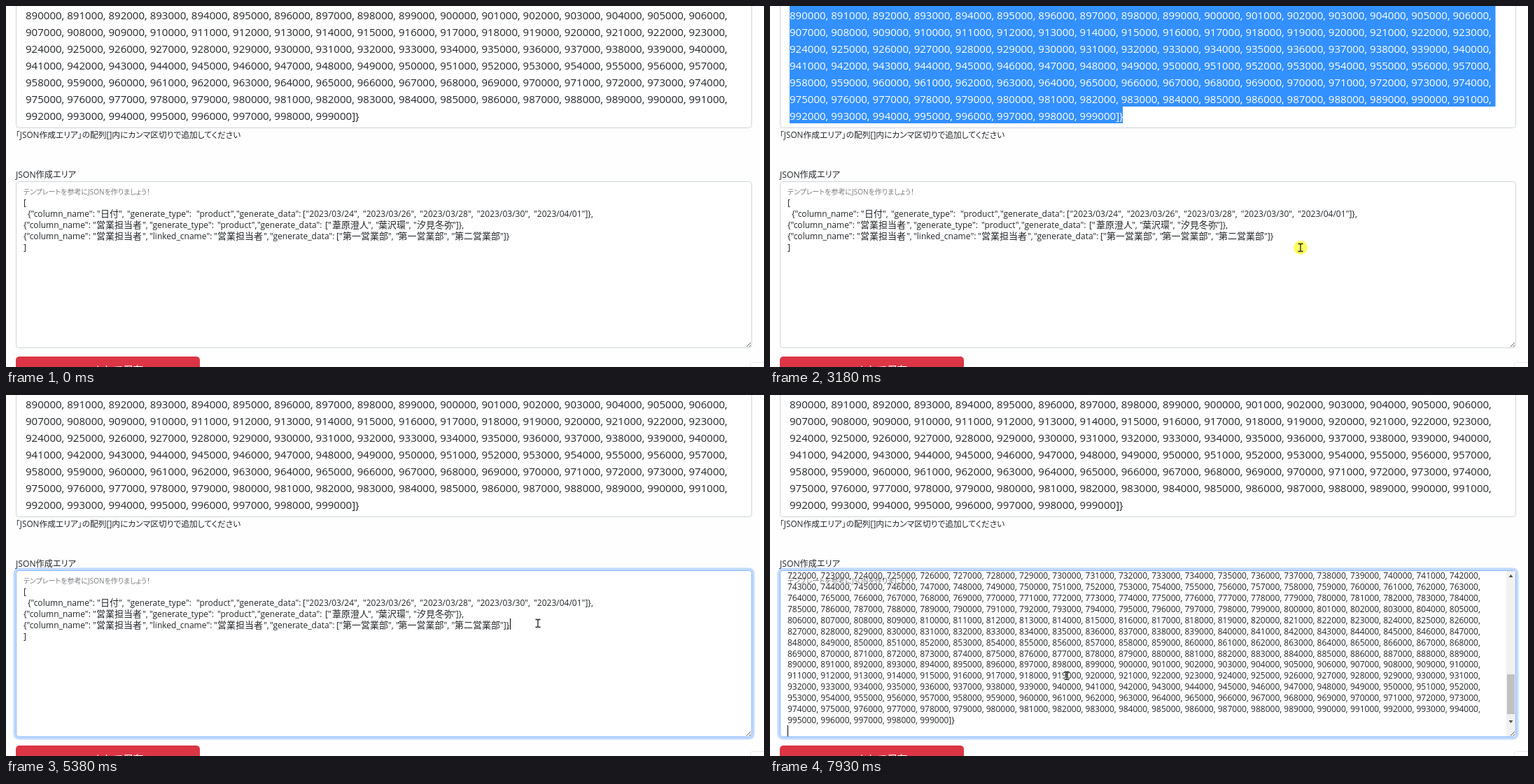
Animation, 1083 px wide and 517 px high, one loop 7990 ms. Source, as an HTML page:

```html
<!DOCTYPE html>
<html lang="ja">
<head>
<meta charset="utf-8">
<title>JSON作成エリア</title>
<style>
  html, body { margin: 0; height: 100%; overflow: hidden; background: #fefefe; }
  svg { display: block; }
  text { font-family: "Open Sans", "Noto Sans CJK JP", sans-serif; fill: #212529; white-space: pre; }
  .kana { font-feature-settings: "palt"; }
  .selected text { fill: #fff; }
  .hidden { display: none; }
</style>
</head>
<body>
<svg width="1083" height="517" viewBox="0 0 1083 517">
  <rect x="14.5" y="-20" width="1051" height="194.5" rx="4" fill="#fff" stroke="#ced4da"/>
  <g id="template">
    <path id="selection" fill="#3390ff" d="M28 0H1036.500V144H504V168H28Z"/>
  </g>
  <text class="kana" x="14" y="189" font-size="11.75">「JSON作成エリア」の配列[]内にカンマ区切りで追加してください</text>
  <text class="kana" x="14" y="246" font-size="12.2">JSON作成エリア</text>

  <rect id="ring" x="12.500" y="249.500" width="1055" height="242" rx="6" fill="none" stroke="#0d6efd" stroke-opacity=".25" stroke-width="4"/>
  <rect id="area" x="14.5" y="251.5" width="1051" height="238" rx="4" fill="#fff"/>
  <g id="draft"></g>
  <g id="pasted">
    <rect x="1052" y="252" width="13" height="237" fill="#f1f1f1"/>
    <rect x="1053" y="400" width="11" height="57" fill="#c1c1c1"/>
    <path d="M1055.500 261L1058.500 257L1061.500 261ZM1055.500 466L1058.500 470L1061.500 466Z" fill="#505050"/>
  </g>
  <text class="kana" x="25" y="269.500" font-size="10" opacity=".6">テンプレートを参考にJSONを作りましょう！</text>
  <path d="M1058 488L1064 482M1062 488L1064 486" stroke="#555"/>
  <rect id="caret" width="1" fill="#000"/>

  <rect x="14" y="502" width="263" height="40" rx="5" fill="#dc3545"/>
  <text class="kana" x="92" y="527" font-size="15" style="fill:#fff">JSONとして保存</text>
  <rect x="1063.5" y="510.5" width="40" height="40" rx="3" fill="#fff" stroke="#e8e8e8"/>

  <g fill="#fff" stroke="#ccc">
    <rect id="modePopup" x="695.5" y="338.5" width="41" height="41" rx="3"/>
    <rect id="suggestPopup" x="711.5" y="338.5" width="88" height="34" rx="3"/>
  </g>
  <g id="pointer">
    <circle id="press" r="10" fill="#ffff5a" opacity=".95"/>
    <path id="beam" d="M-3.500 -5.500H-1L0 -4.500L1 -5.500H3.500M-3.500 5.500H-1L0 4.500L1 5.500H3.500M0 -5V5" fill="none" stroke="#222" stroke-width="1.300"/>
    <path id="arrow" d="M.5 .5V10.500L2.800 8.400L4.500 12L6 11.300L4.400 7.800H7.600Z" fill="#fff" stroke="#333" stroke-width=".9"/>
  </g>
</svg>
<script>
const LOOP = 7990;
const $ = id => document.getElementById(id);

function addText(parent, x, y, size, content) {
  const el = document.createElementNS('http://www.w3.org/2000/svg', 'text');
  for (const [key, value] of Object.entries({ x, y, 'font-size': size })) el.setAttribute(key, value);
  el.textContent = content;
  parent.append(el);
  return el;
}

// Rows of consecutive thousands, closed after 999000.
function addNumbers(parent, first, perRow, x, y, size, leading) {
  for (let start = first; start < 1000; start += perRow, y += leading) {
    const count = Math.min(perRow, 1000 - start);
    const row = Array.from({ length: count }, (_, i) => `${start + i}000`).join(', ');
    addText(parent, x, y, size, row + (start + count < 1000 ? ',' : ']}'));
  }
}

// Chunks alternate between x position and text.
function addLine(y, ...chunks) {
  for (let i = 0; i < chunks.length; i += 2) {
    const isKanji = chunks[i + 1].charCodeAt(0) > 255;
    addText($('draft'), chunks[i], y, isKanji ? 13 : 12.02, chunks[i + 1]);
  }
}

addNumbers($('template'), 890, 17, 28, 19, 15.06, 23.95);
addNumbers($('pasted'), 722, 21, 25, 263, 12.02, 15.93);

const column = '{"column_name": "', type = '"generate_type":', data = '"generate_data":';
const product = '"product",', staff = '営業担当者', next = '", "';
addLine(286, 25, '[');
addLine(302, 31, column, 135, '日付', 161, '",', 173, type, 272, product, 329, data, 424, '[');
['24', '26', '28', '30'].forEach((day, i) => addLine(302, 428.5 + i * 81.4, `"2023/03/${day}",`));
addLine(302, 754, '"2023/04/01"]},');
addLine(318, 25, column, 129, staff, 195, '",', 205, type, 302, product, 359, data, 456, '["',
  466, '葦原澄人', 517, next, 532, '葉沢環', 571, next, 587, '汐見冬弥', 638, '"]},');
addLine(333.5, 25, column, 129, staff, 195, '",', 205, '"linked_cname":', 297, '"', 302, staff, 368, '",',
  377, data, 472, '["', 481, '第一営業部', 546, next, 560.5, '第一営業部', 625.5, next,
  641, '第二営業部', 706, '"]}');
const comma = addText($('draft'), 716.5, 333.5, 12.02, ',');
const bracket = addText($('draft'), 25, 350, 12.02, ']');

const path = [
  [70, 884, 412], [590, 507, 124], [800, 526, 159], [2660, 526, 159],
  [3150, 758, 346], [3180, 758, 346], [3250, 758, 339], [3430, 758, 267],
  [3569, 758, 267], [3570, 760, 327], [6900, 760, 327], [7630, 434, 403],
  [7730, 434, 403], [7870, 424, 402]
];
const presses = [[870, 940], [1000, 1470], [1540, 1610], [3180, 3250], [3570, 3640]];
// start, end, x, top
const carets = [
  [3250, 3570, 28, 338], [3570, 4100, 717, 320], [4570, 5840, 720, 320],
  [5840, 6440, 25, 338], [6440, 7060, 25, 473], [7590, LOOP, 25, 473]
];

const during = (t, start, end) => t >= start && t < end;
const show = (id, visible) => $(id).classList.toggle('hidden', !visible);
const mix = (a, b, k) => a + (b - a) * k;

function pointerAt(t) {
  const i = path.findIndex(key => key[0] > t);
  if (i < 0) return path.at(-1).slice(1);
  if (i === 0) return path[0].slice(1);
  const [a, b] = [path[i - 1], path[i]];
  const k = (t - a[0]) / (b[0] - a[0]);
  const eased = b[0] - a[0] > 200 ? k * k * (3 - 2 * k) : k;
  return [mix(a[1], b[1], eased), mix(a[2], b[2], eased)];
}

function render(t) {
  const sample = during(t, 3570, 3640) ? t : Math.floor((t - 30) / 70) * 70 + 30;
  const [x, y] = pointerAt(sample);
  const overText = y < 144 || y > 251;
  $('pointer').setAttribute('transform', `translate(${x.toFixed(1)} ${y.toFixed(1)})`);
  show('pointer', t >= 70);
  show('press', presses.some(([start, end]) => during(t, start, end)));
  show('beam', overText);
  show('arrow', !overText);

  const selected = during(t, 1400, 3250);
  show('selection', selected);
  $('template').classList.toggle('selected', selected);

  const focus = Math.min(1, Math.max(0, (t - 3220) / 200));
  $('ring').setAttribute('opacity', focus);
  const border = [[206, 134], [212, 183], [218, 254]].map(([a, b]) => Math.round(mix(a, b, focus)));
  $('area').setAttribute('stroke', `rgb(${border})`);

  show('draft', t < 6440);
  show('pasted', t >= 6440);
  comma.classList.toggle('hidden', t < 4570);
  bracket.setAttribute('y', t < 5840 ? 350 : 366);
  show('modePopup', during(t, 4430, 4570));
  show('suggestPopup', during(t, 4700, 5250));

  const caret = carets.find(([start, end]) => during(t, start, end));
  show('caret', caret);
  if (caret) {
    $('caret').setAttribute('x', caret[2]);
    $('caret').setAttribute('y', caret[3]);
    $('caret').setAttribute('height', 16);
  }
}

const begin = performance.now();
function tick() {
  render((performance.now() - begin) % LOOP);
  requestAnimationFrame(tick);
}
tick();
</script>
</body>
</html>
```
